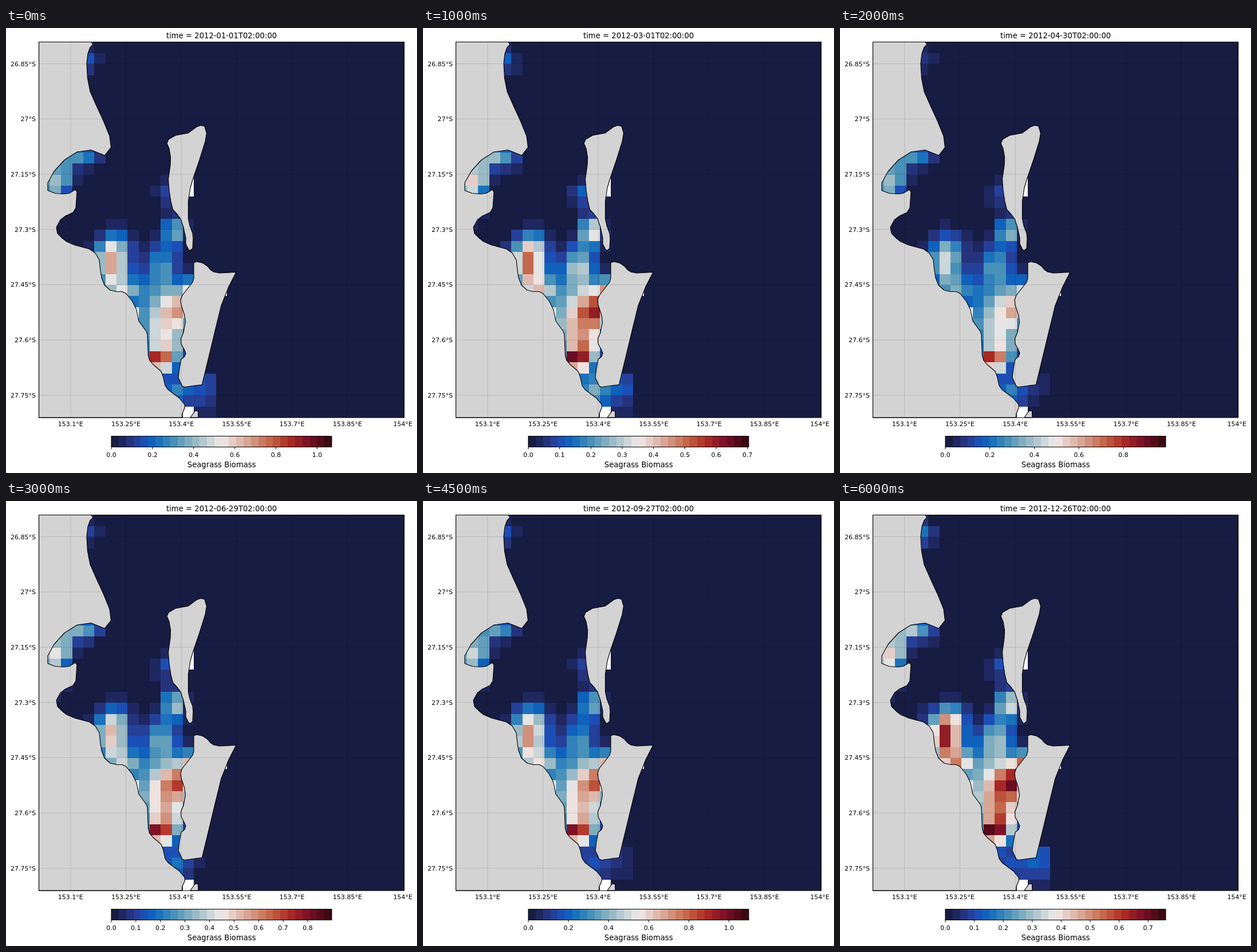
An HTML page that plays this animation: 718x779 px, repeating every 6.5 s.

```html
<!DOCTYPE html>
<html lang="en">
<head>
<meta charset="utf-8">
<title>Seagrass Biomass</title>
<style>
html, body { margin: 0; width: 100%; height: 100%; overflow: hidden; background: #fff; }
svg { display: block; }
text { font-family: "DejaVu Sans", sans-serif; font-size: 11px; fill: #000; }
.big { font-size: 13.2px; }
.land { fill: #d3d3d3; stroke: #000; stroke-width: 1.15; stroke-linejoin: round; }
.grid { stroke: #000; stroke-opacity: .14; stroke-width: .9; }
.line { fill: none; stroke: #000; stroke-width: 1; }
.crisp { shape-rendering: crispEdges; }
</style>
</head>
<body>
<svg id="stage" width="718" height="779" viewBox="0 0 718 779"></svg>
<script>
const STEP = 500, LEVELS = 30;
const LEFT = 57.5, TOP = 24.5, CELL = 19.34, COLS = 33, ROWS = 34;
const RIGHT = LEFT + COLS * CELL, BOTTOM = TOP + ROWS * CELL;
const BAR = { x: 184, y: 714.5, w: 385, h: 19 };
const stage = document.getElementById('stage');

// Top of the colour scale, one value per 30 days
const tops = [1.071, .828, .704, .993, .99, .893, .898, .897, .985, 1.098, .899, .839, .761];

function add(tag, attrs, parent = stage) {
  const el = document.createElementNS('http://www.w3.org/2000/svg', tag);
  for (const k in attrs) el.setAttribute(k, attrs[k]);
  parent.appendChild(el);
  return el;
}
function label(x, y, str, anchor = 'middle', cls = '', parent = stage) {
  const el = add('text', { x, y, 'text-anchor': anchor, class: cls }, parent);
  el.textContent = str;
  return el;
}

// Diverging palette: [position, r, g, b]
const stops = [
  [0, 23, 28, 66], [1 / 11, 41, 58, 143], [.14, 27, 80, 184], [2 / 11, 11, 102, 189],
  [3 / 11, 69, 144, 185], [4 / 11, 142, 181, 194], [5 / 11, 210, 216, 219], [.5, 241, 236, 235],
  [6 / 11, 230, 210, 204], [7 / 11, 213, 157, 137], [8 / 11, 196, 101, 72],
  [9 / 11, 172, 43, 36], [10 / 11, 120, 14, 40], [1, 60, 9, 17]
];
function shade(level) {
  const p = level / (LEVELS - 1);
  let i = 1;
  while (i < stops.length - 1 && p > stops[i][0]) i++;
  const a = stops[i - 1], b = stops[i], k = (p - a[0]) / (b[0] - a[0]);
  return `rgb(${[1, 2, 3].map(n => Math.round(a[n] + (b[n] - a[n]) * k))})`;
}
const palette = Array.from({ length: LEVELS }, (_, i) => shade(i));

// Seasonal factor around 1 that is highest in the month `peak`
const wave = (peak, swing, period = 12) =>
  m => 1 + swing * Math.cos(2 * Math.PI * (m - peak) / period);

// Meadows: a season and bell-shaped patches [col, row, width, height, biomass]
const meadows = [
  { season: wave(11, .3), patches: [[4, 1.1, .9, 1.1, .12]] },
  { season: wave(8.5, .12), patches: [
    [.6, 12.2, 1.2, 2.2, .45], [3.1, 9.75, 1.7, 1, .32], [2, 11.6, .65, 1.3, .2]] },
  { season: wave(10, .25), patches: [
    [6, 19.6, 1.5, 1.9, .57], [6.5, 17.8, 1.2, 1.2, .19], [7, 22, 1.6, 1.2, .36]] },
  { season: wave(0, 0), patches: [
    [10.6, 19.8, 1.4, 1.9, .27], [11.7, 16.6, .9, 1.3, .39], [11, 13.2, 1, 1, .12]] },
  { season: wave(9, .17), patches: [
    [10.1, 25, 2, 3.3, .41], [12.2, 23.7, 1.5, 1.9, .57],
    [11.3, 27.3, 1.4, 1.6, .33], [13.1, 21.9, .7, 1, .32]] },
  { season: m => tops[m], patches: [[10.3, 28.4, .9, .9, .74]] },
  { season: wave(1, .45, 24), patches: [[11.9, 31.2, 1.4, 1.5, .17]] },
  { season: wave(0, .9), patches: [[14.4, 30.6, 1.4, 2, .075]] }
];
const bell = (col, row, [c, r, w, h, amp]) =>
  amp * Math.exp(-(((col - c) / w) ** 2) - ((row - r) / h) ** 2);

const sea = add('g', { class: 'crisp' });
function tile(col, row, fill, w = 1, h = 1) {
  return add('rect', {
    x: LEFT + col * CELL, y: TOP + row * CELL, width: CELL * w, height: CELL * h, fill
  }, sea);
}
tile(0, 0, palette[0], COLS, ROWS);

// Seagrass grows inside the bay and on a shelf at its southern mouth
const cells = [];
for (let row = 0; row < ROWS; row++) {
  const edge = row < 30 ? 14 : 16;
  for (let col = 0; col < edge; col++) {
    const shares = meadows.map(({ patches }) =>
      patches.reduce((sum, p) => sum + bell(col, row, p), 0));
    cells.push({ el: tile(col, row, palette[0]), shares });
  }
}

// Cells without data
tile(13, 12, '#fff', 1, 2);
tile(16, 22, '#fff');
tile(8, 24, '#fff');
tile(13, 33, '#fff');

const land = d => add('path', { d: 'M' + d + 'Z', class: 'land' });
land('57.5 24.5H149L152 29 147 34 143 45 141 62 142.5 88 147 111 158 136 170 162 181 189 183.5 209 172.5 223' +
  ' 148.5 213.5 124 217 102 231 84 251 73 271V284.5L86 289.5 101 290.5 110 289.5 121 283 124 287 122 315' +
  ' 117 323 104 329 95 336 88 349 90 359.5 99 368.5 106 374 120 380 146 387 156 394 163 406 165 425 167 437' +
  ' 172 450 182 459 193 461.5 203 461.5 210 465 221 479 228 493 232 513 245 531 247 536 248.5 573 251 582' +
  ' 257 589 271 601 274.5 610 278 626 283 633 303 648 312 659 312.5 664 308 675 307.5 682H57.5');
land('281 202L284 195 296 188 318 184 333 173 340 170.5 347 172 350.5 184 348 199 338 231 326 266 322 280' +
  ' 318.5 303V334L321 346 326 359 327 369 326 386 321 390 318 386 314 378V367L310 349 305 334 299 326' +
  ' 291.5 318 288 304 285 284 283.5 265 287 240 287.5 226 285 211');
land('328 411L333 409 344 411.5 352 417 357 423 363 427 373 429 402 427.5 389 453 376 486 366 527 354 577' +
  ' 342.5 624.5 333 625.5 312 628.5 308 627 301 612 303 596 306 580 312 575 314 569 311 562 306 553' +
  ' 305.5 544 310 533 313.5 515 312 503 306 485 305 476 308 468 326 445 328 438');
land('322 682L330 670.5 335.5 670 336 682');

// Graticule every 0.15 degrees
for (let i = 0; i < 7; i++) {
  const x = 112.8 + i * 96.72, y = 62.5 + i * 96.72;
  add('path', { d: `M${x} ${TOP}V${BOTTOM}M${LEFT} ${y}H${RIGHT}`, class: 'grid' });
  label(x, 697, +(153.1 + i * .15).toFixed(2) + '°E');
  label(52, y + 4, +(26.85 + i * .15).toFixed(2) + '°S', 'end');
}
add('rect', { x: LEFT, y: TOP, width: RIGHT - LEFT, height: BOTTOM - TOP, class: 'line' });

const bins = add('g', { class: 'crisp' });
const bin = BAR.w / LEVELS;
palette.forEach((fill, i) =>
  add('rect', { x: BAR.x + i * bin, y: BAR.y, width: bin + .3, height: BAR.h, fill }, bins));
add('rect', { x: BAR.x, y: BAR.y, width: BAR.w, height: BAR.h, class: 'line' });
const ticks = add('g', {});
label(376.7, 769, 'Seagrass Biomass', 'middle', 'big');
const title = label(376.6, 18, '', 'middle', 'big');

function drawTicks(top) {
  ticks.replaceChildren();
  const gap = top < .9 ? .1 : .2;
  for (let v = 0; v <= top; v += gap) {
    const x = BAR.x + v / top * BAR.w;
    add('path', { d: `M${x} ${BAR.y + BAR.h}v4`, class: 'line' }, ticks);
    label(x, 751, v.toFixed(1), 'middle', '', ticks);
  }
}

function draw(month) {
  const top = tops[month];
  const factors = meadows.map(({ season }) => season(month));
  for (const { el, shares } of cells) {
    const biomass = shares.reduce((sum, s, i) => sum + s * factors[i], 0);
    const level = Math.floor(biomass / top * LEVELS + .3);
    el.setAttribute('fill', palette[Math.min(LEVELS - 1, level)]);
  }
  const day = new Date(Date.UTC(2012, 0, 1 + 30 * month, 2));
  title.textContent = 'time = ' + day.toISOString().slice(0, 19);
  drawTicks(top);
}

let shown = -1;
function tick() {
  const month = Math.floor(performance.now() / STEP) % tops.length;
  if (month !== shown) draw(shown = month);
  requestAnimationFrame(tick);
}
tick();
</script>
</body>
</html>
```
